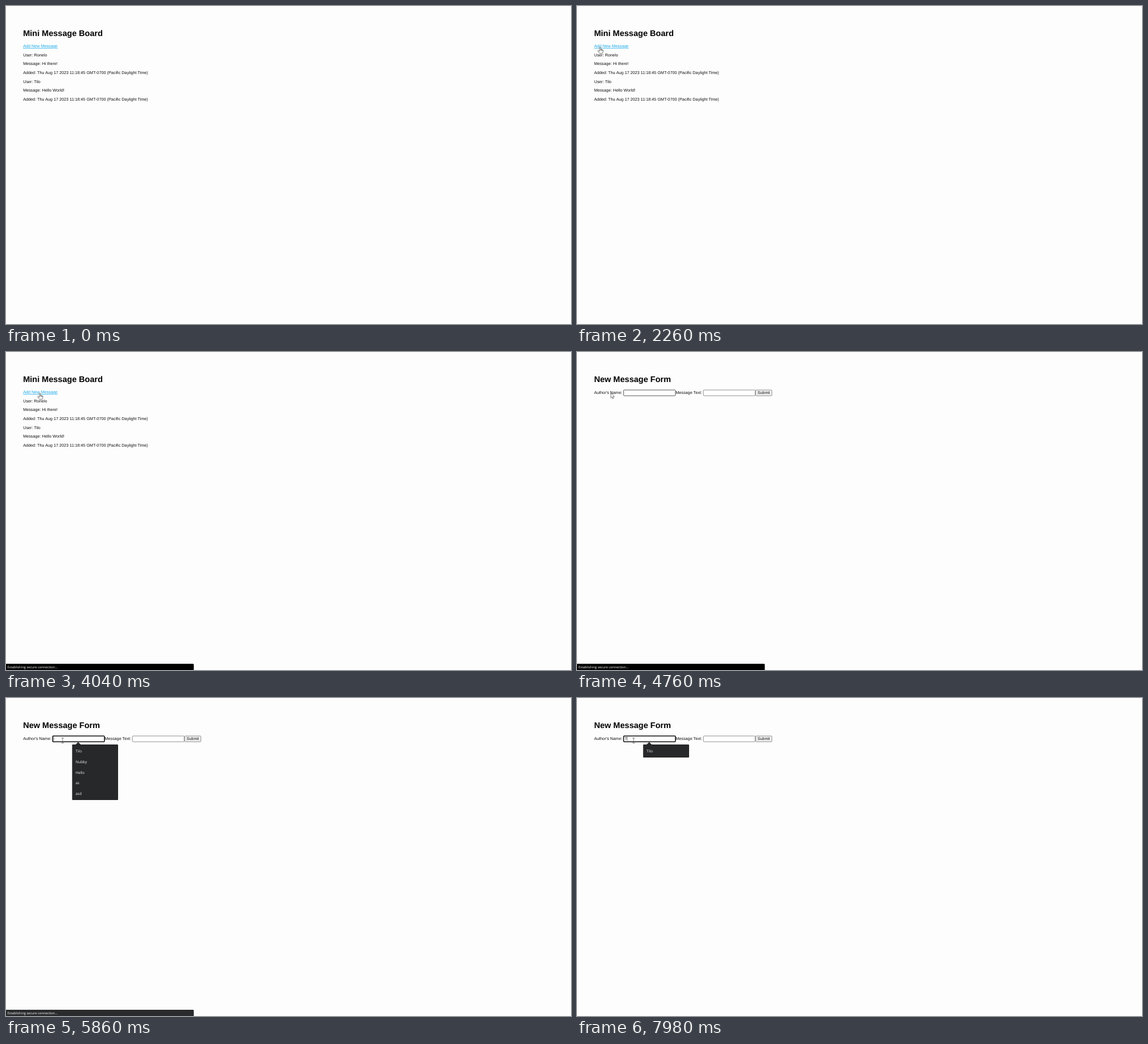
An HTML page for the animation above (8 s loop, 998 px wide and 561 px high).

```html
<!DOCTYPE html>
<html lang="en">
<head>
<meta charset="utf-8">
<title>Mini Message Board</title>
<style>
  html, body { margin: 0; width: 100%; height: 100%; overflow: hidden; background: #fdfdfd; }
  svg { display: block; width: 100vw; height: 100vh; }
  /* The tiny rotation keeps baselines at fractional heights instead of snapping to pixels. */
  text {
    font: 7.28px "Liberation Sans", Arial, sans-serif; fill: #111; white-space: pre;
    text-rendering: geometricPrecision; transform: rotate(.01deg); transform-box: fill-box;
  }
  .title { font-size: 14.55px; font-weight: bold; fill: #000; }
  .link { fill: #18a8e8; text-decoration: underline; }
  .control { font-size: 6.93px; }
  .field { fill: #fff; stroke: #858585; stroke-width: .9; }
  .field.hover { stroke: #444; }
  .field.focus { stroke: #101010; stroke-width: 1.6; }
  .menu text { font: 6.5px "Open Sans", "Noto Sans", sans-serif; fill: #f4f4f4; }
  .status text { font: 5.85px "Open Sans", "Noto Sans", sans-serif; fill: #fff; }
  .cursor { fill: #fff; stroke: #333; stroke-width: .65; stroke-linejoin: round; stroke-linecap: round; }
</style>
</head>
<body>
<svg viewBox="0 0 998 561">
  <g id="board">
    <text class="title" x="30.15" y="53.05">Mini Message Board</text>
    <text class="link" x="30.15" y="73.3">Add New Message</text>
  </g>

  <g id="form">
    <text class="title" x="30.15" y="53.05">New Message Form</text>
    <text x="30.15" y="74.4">Author's Name:</text>
    <rect id="author" class="field" x="82.4" y="67" width="91.4" height="10.2" rx="1"/>
    <text x="174.2" y="74.4">Message Text:</text>
    <rect class="field" x="223.3" y="67" width="91.4" height="10.2" rx="1"/>
    <rect class="field" x="315.6" y="67" width="28.6" height="10.2" rx="1" style="fill:#efefef"/>
    <text class="control" x="329.9" y="74.3" text-anchor="middle">Submit</text>
    <text class="control" id="typed" x="84.3" y="74.4">T</text>
    <path id="caret" stroke="#222" stroke-width=".6" d="M0 68.4v7.2"/>
  </g>

  <g id="menu" class="menu">
    <path d="M122.5 82.5l5-4.8 5 4.8z" fill="#26282a"/>
    <rect id="menuBox" x="116.8" y="82" width="81.2" rx="1.2" fill="#26282a"/>
  </g>

  <g id="status" class="status">
    <path id="statusBar" d="M0 550h330.2q1.5 0 1.5 1.5V561H0z"/>
    <text x="2.4" y="557.9">Establishing secure connection...</text>
  </g>

  <g id="cursor" class="cursor">
    <path id="arrow" d="M0 0v8.6l2-1.8 1.3 3 1.4-.6-1.3-2.9h2.7z"/>
    <path id="hand" d="M-1 .4Q0-.8 1 .4V4Q2 3.2 2.6 4.3 3.6 3.7 4.1 4.8 5.3 4.5 5.3 6V8L4.4 10.8H-.9L-3.8 7Q-4.2 5.7-3 5.8L-1 7.2ZM1 4v1.7M2.6 4.3v1.7M4.1 4.8v1.5"/>
    <path id="beam" fill="none" d="M-2-4.5H-.6L0-4 .6-4.5H2M0-4V4M-2 4.5H-.6L0 4 .6 4.5H2"/>
  </g>
</svg>

<script>
const LOOP = 8000;
const PAGE_LOAD = 4500, FOCUS = 5400, TYPE = 7700;
const $ = id => document.getElementById(id);
const show = (id, on) => $(id).style.display = on ? "" : "none";

function addText(parent, x, y, content) {
  const node = document.createElementNS("http://www.w3.org/2000/svg", "text");
  node.setAttribute("x", x);
  node.setAttribute("y", y);
  node.textContent = content;
  parent.append(node);
  return node;
}

const added = "Added: Thu Aug 17 2023 11:18:45 GMT-0700 (Pacific Daylight Time)";
["User: Ronelo", "Message: Hi there!", added, "User: Tilo", "Message: Hello World!", added]
  .forEach((line, i) => addText($("board"), 30.15, 88.9 + i * 15.594, line));
const options = ["Tilo", "Nubby", "Hello", "as", "asd"]
  .map((label, i) => addText($("menu"), 123, 96 + i * 18.75, label));

// Pointer stops: time, x, y
const path = [
  [20, 913, 259], [720, 549, 215], [1560, 2, 146], [1680, 1, 140], [2200, 40.8, 72.6],
  [2600, 40.8, 72.6], [3200, 59.8, 72.6], [5020, 59.8, 72.6], [5350, 100, 75], [LOOP, 100, 75]
];

function pointerAt(t) {
  const i = Math.max(1, path.findIndex(stop => stop[0] >= t));
  const [t0, x0, y0] = path[i - 1], [t1, x1, y1] = path[i];
  let k = Math.max(0, (t - t0) / (t1 - t0));
  if (t > 1680) k = k * k * (3 - 2 * k);
  return [x0 + (x1 - x0) * k, y0 + (y1 - y0) * k];
}

function draw(t) {
  const onForm = t >= PAGE_LOAD, focused = t >= FOCUS, typed = t >= TYPE;
  show("board", !onForm);
  show("form", onForm);
  $("author").setAttribute("class", "field " + (focused ? "focus" : "hover"));
  show("typed", typed);
  show("caret", focused && (typed || (t - FOCUS) % 1000 < 500));
  $("caret").setAttribute("transform", `translate(${typed ? 88.8 : 84.6} 0)`);

  show("menu", t >= FOCUS + 50);
  $("menuBox").setAttribute("height", typed ? 22.9 : 98);
  options.forEach((option, i) => option.style.display = typed && i ? "none" : "");

  show("status", t >= 3750 && t < 6150);
  $("statusBar").setAttribute("fill", focused ? "#292b2d" : "#000");

  const [x, y] = pointerAt(t);
  const overLink = !onForm && x > 30 && x < 91 && y > 66 && y < 78;
  const overField = onForm && x > 82;
  show("cursor", t >= 20);
  $("cursor").setAttribute("transform", `translate(${x} ${y})`);
  show("hand", overLink);
  show("beam", overField);
  show("arrow", !overLink && !overField);
}

const start = performance.now();
function tick() {
  draw((performance.now() - start) % LOOP);
  requestAnimationFrame(tick);
}
tick();
</script>
</body>
</html>
```
